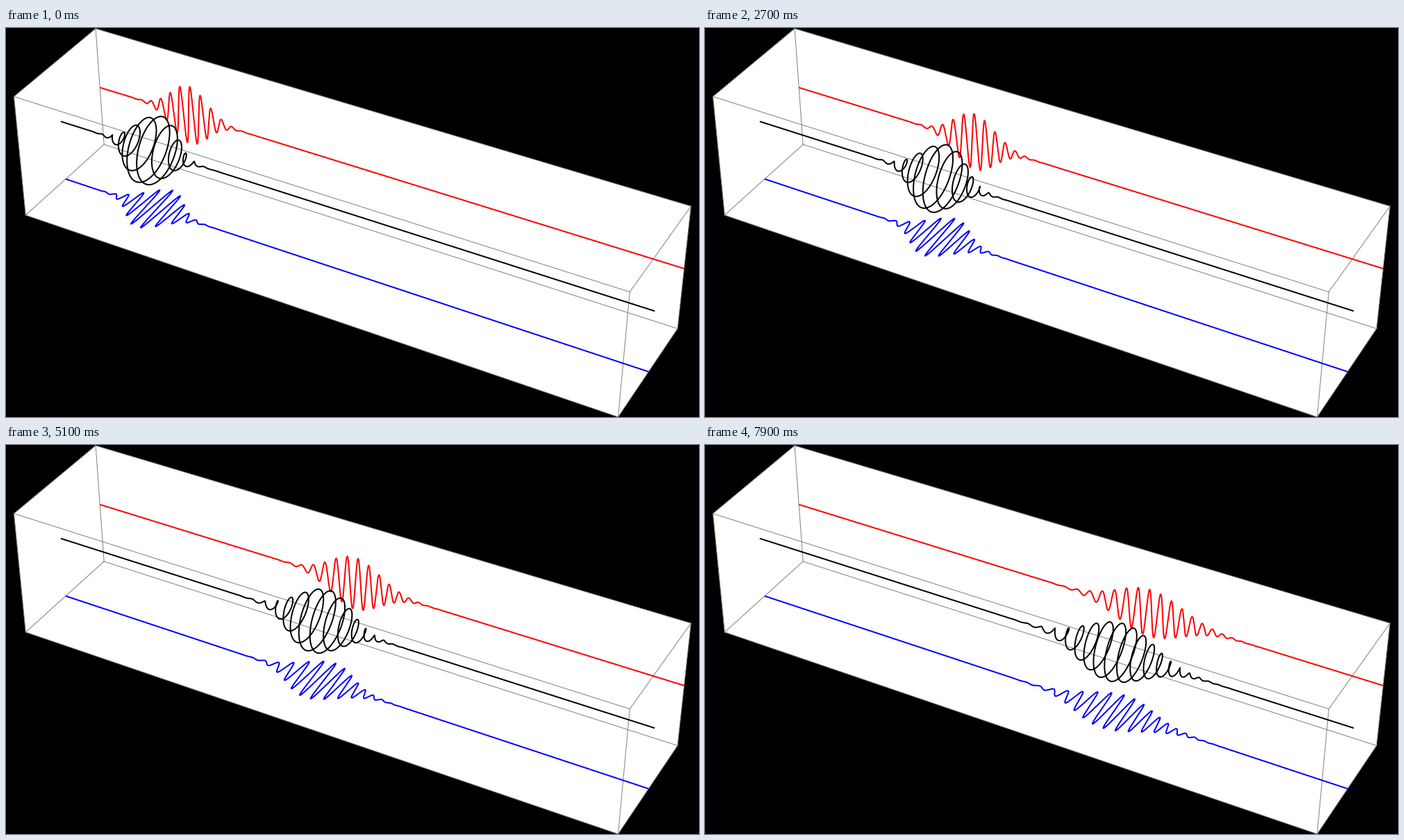
Animation, 998 px wide and 561 px high, one loop 8000 ms. Source, as a matplotlib script:

```python
import itertools

import matplotlib.pyplot as plt
import numpy as np
from matplotlib.animation import FuncAnimation

W, H, DPI = 998, 561, 64
FRAMES, STEP = 80, 100  # ms per frame

# Perspective: centre of the left face and the three vanishing points,
# each with the weight of one unit step towards it.
# Box space: x right 0..1, y back -1..1, z up -1..1
ORIGIN = np.array([78.4, 134.3, 1])
RIGHT = -0.1075 * np.array([-7023, -2136, 1])
BACK = 0.02205 * np.array([2690, -2134, 1])
UP = -0.01784 * np.array([481, 4870, 1])
CAMERA = np.stack([RIGHT, BACK, UP, ORIGIN], axis=1)

# Free Gaussian wave packet
X0, SPEED = 0.168, 0.058
K, SIGMA = 337.0, 0.0328
AMP, PHASE = 0.495, -1.10
SPREAD = SIGMA**2 * K / SPEED  # dispersion time in seconds


def project(x, y, z):
    u, v, w = CAMERA @ np.stack(np.broadcast_arrays(x, y, z, 1.0))
    return u / w, v / w


def packet(x, t):
    xi = x - X0 - SPEED * t
    spread = 1 + 1j * t / SPREAD
    carrier = K * xi + K * SPEED * t / 2 + PHASE
    return AMP / np.sqrt(spread) * np.exp(-xi**2 / (2 * SIGMA**2 * spread) + 1j * carrier)


def px(width):
    return width * 72 / DPI


fig = plt.figure(figsize=(W / DPI, H / DPI), dpi=DPI, facecolor="black")
ax = fig.add_axes([0, 0, 1, 1])
ax.set_xlim(-0.5, W - 0.5)
ax.set_ylim(H - 0.5, -0.5)
ax.axis("off")

# White silhouette, then the twelve grey edges
hull = [(0, 1, 1), (1, 1, 1), (1, 1, -1), (1, -1, -1), (0, -1, -1), (0, -1, 1)]
ax.fill(*project(*zip(*hull)), color="white", lw=0)
corners = itertools.product((0, 1), (-1, 1), (-1, 1))
for a, b in itertools.combinations(corners, 2):
    if sum(i != j for i, j in zip(a, b)) == 1:
        ax.plot(*project(*zip(a, b)), color="#808080", lw=px(1))

xs = np.linspace(0, 1, 4000)
red, blue, black = (
    ax.plot([], [], color=c, lw=px(2), solid_capstyle="butt", solid_joinstyle="round")[0]
    for c in ("#ff0000", "#0000ff", "#000000")
)


def draw(frame):
    psi = packet(xs, frame * STEP / 1000)
    red.set_data(*project(xs, 1, psi.real))
    blue.set_data(*project(xs, -psi.imag, -1))
    black.set_data(*project(xs, -psi.imag, psi.real))
    return red, blue, black


anim = FuncAnimation(fig, draw, frames=FRAMES, interval=STEP, repeat=True, repeat_delay=0)
plt.show()
```
